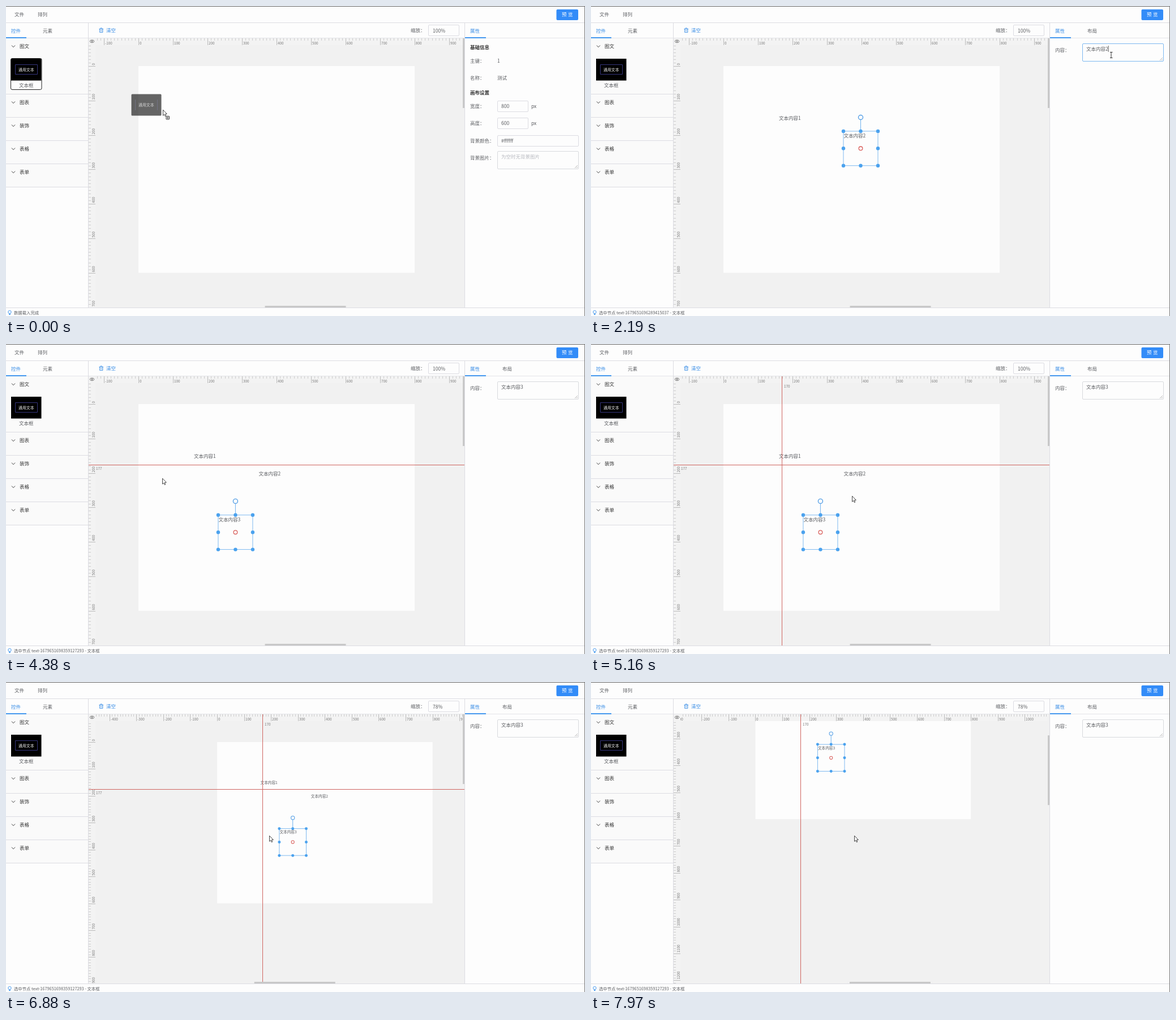
These frames come from a looping animation (1023 px wide and 547 px high, 8 s). An HTML page with a canvas:

```html
<!DOCTYPE html>
<html lang="zh-CN">
<head>
<meta charset="utf-8">
<style>
html, body { margin: 0; width: 100%; height: 100%; overflow: hidden; background: #fdfdfd; }
canvas { display: block; }
</style>
</head>
<body>
<canvas id="stage" width="1023" height="547"></canvas>
<script>
const c = document.getElementById('stage').getContext('2d');
const LOOP = 8000, STEP = 156.25;
const SX = 0.61, SY = 0.608;            // screen pixels per canvas unit at 100%
const FONT = '"Noto Sans CJK SC", "Noto Sans CJK", "Noto Sans", sans-serif';
const INK = '#5c5e62', DARK = '#333', BLUE = '#3a8ee6', LINE = '#dcdce2', GUIDE = '#cf6560';

// Pointer keys: step, x, y
const PATH = [[0, 277, 183], [2, 332, 191], [6, 919, 86], [7, 919, 86], [9, 45, 112],
  [11, 446, 221], [13, 919, 86], [14, 919, 86], [16, 45, 112], [18, 375, 302],
  [20, 919, 86], [21, 919, 86], [23, 425, 96], [24, 385, 62], [27, 400, 213.6],
  [29, 152, 260], [31, 337.7, 240], [33, 461, 268], [38, 465, 271]];
const ZOOM = [[33, 1], [38, 0.8], [39, 0.78]];
const PAN_X = [[40, 0], [44, 85.3], [47, 2.8]];
const PAN_Y = [[46, 0], [51, 148.6]];
const DRAGS = [[0, 2], [9, 11], [16, 18]];
const FOCUS = [[6, 9], [13, 16], [20, 24]];
const ITEMS = [
  { x: 160, y: 138, drop: 2, typed: 7, id: '1679651694176379212' },
  { x: 347.5, y: 189, drop: 11, typed: 14, id: '1679651696289415037' },
  { x: 231, y: 322, drop: 18, typed: 21, id: '1679651698359127293' }];

function track(keys, n, i = 1) {
  if (n <= keys[0][0]) return keys[0][i];
  for (let k = 1; k < keys.length; k++) {
    const a = keys[k - 1], b = keys[k];
    if (n <= b[0]) return a[i] + (b[i] - a[i]) * (n - a[0]) / (b[0] - a[0]);
  }
  return keys[keys.length - 1][i];
}
const within = (spans, n) => spans.some(([a, b]) => n >= a && n < b);

function rect(x, y, w, h, fill) {
  c.fillStyle = fill;
  c.fillRect(x, y, w, h);
}
function box(x, y, w, h, stroke, fill, r = 1.5) {
  c.beginPath();
  c.roundRect(x + 0.5, y + 0.5, w, h, r);
  if (fill) { c.fillStyle = fill; c.fill(); }
  if (stroke) { c.strokeStyle = stroke; c.lineWidth = 1; c.stroke(); }
}
function text(s, x, y, color = INK, size = 8.5, weight = 400) {
  c.font = `${weight} ${size}px ${FONT}`;
  c.fillStyle = color;
  c.fillText(s, x, y);
}
function lines(points, stroke, width = 1, fill, close) {
  c.beginPath();
  points.forEach(([x, y], i) => i ? c.lineTo(x, y) : c.moveTo(x, y));
  if (close) c.closePath();
  if (fill) { c.fillStyle = fill; c.fill(); }
  c.strokeStyle = stroke;
  c.lineWidth = width;
  c.stroke();
}
function dot(x, y, r, fill, stroke, width = 1.3) {
  c.beginPath();
  c.arc(x, y, r, 0, 7);
  if (fill) { c.fillStyle = fill; c.fill(); }
  if (stroke) { c.strokeStyle = stroke; c.lineWidth = width; c.stroke(); }
}
function clipped(x, y, w, h, draw) {
  c.save();
  c.beginPath();
  c.rect(x, y, w, h);
  c.clip();
  draw();
  c.restore();
}
function textarea(y, focus) {
  box(868, y, 143, 31, focus ? '#7db8f0' : '#d8dade', '#fdfdfd');
  lines([[1005, y + 30], [1010, y + 25]], '#999', 0.7);
  lines([[1008, y + 30], [1010, y + 28]], '#999', 0.7);
}

function chrome(zoom) {
  rect(0, 0, 1023, 547, '#fdfdfd');
  text('文件', 15, 15);
  text('排列', 56, 15);
  box(972, 5.5, 38.5, 19, null, '#338cf8', 2);
  text('预', 982, 15, '#fff');
  text('览', 993, 15, '#fff');
  rect(0, 29, 1023, 1, LINE);

  rect(0, 57, 145, 262, '#fafafa');
  rect(0, 56, 145, 1, '#e4e5e9');
  text('控件', 9, 44, BLUE);
  text('元素', 65, 44);
  rect(0, 55, 36, 2, '#4598ee');
  ['图文', '图表', '装饰', '表格', '表单'].forEach((name, i) => {
    const y = i ? 129 + 41 * i : 71;
    lines([[10, y - 1.5], [13, y + 1.7], [16, y - 1.5]], '#444');
    text(name, 24, y, DARK);
    rect(0, 155 + 41 * i, 145, 1, LINE);
  });

  rect(158, 42, 0, 0, BLUE);
  lines([[164.5, 40.5], [172, 40.5]], BLUE);
  lines([[166.8, 39.5], [166.8, 38.8], [169.7, 38.8], [169.7, 39.5]], BLUE, 0.8);
  lines([[165.6, 40.5], [165.6, 46.5], [170.9, 46.5], [170.9, 40.5]], BLUE, 0.9);
  lines([[167.4, 42], [167.4, 45]], BLUE, 0.6);
  lines([[169.2, 42], [169.2, 45]], BLUE, 0.6);
  text('清空', 177, 43, BLUE);
  text('缩放：', 715, 43);
  box(746, 33, 54, 19, LINE);
  text(Math.round(zoom * 100) + '%', 754, 43.3);
}

function thumb(hover) {
  if (hover) box(8, 92, 54.5, 55, '#222', '#fdfdfd', 2.5);
  rect(9, 93, 53.5, 38.5, '#000');
  box(16, 103, 39, 17, '#35357c', null, 0);
  text('通用文本', 22, 112, '#eee', 6.9);
  text('文本框', 23, 139.5);
}

function canvasProps() {
  text('基础信息', 820, 72.5, DARK, 8.5, 700);
  text('主键：', 820, 97);
  text('1', 868, 97);
  text('名称：', 820, 127);
  text('测试', 868, 127);
  text('画布设置', 820, 152.5, DARK, 8.5, 700);
  [['宽度：', '800', 177], ['高度：', '600', 207]].forEach(([label, value, y]) => {
    text(label, 820, y);
    box(868, y - 10, 54, 19, LINE);
    text(value, 875, y);
    text('px', 928, y);
  });
  text('背景颜色：', 820, 237.5);
  box(868, 228, 143, 19, LINE);
  text('#ffffff', 875, 237.5);
  text('背景图片：', 820, 268);
  textarea(256, false);
  text('为空时无背景图片', 875, 266, '#b8bac0');
}

function rightPanel(item, label, focus, caret) {
  rect(811, 56, 212, 1, '#e4e5e9');
  text('属性', 820, 44, BLUE);
  rect(811, 55, 37, 2, '#4598ee');
  if (!item) return canvasProps();
  text('布局', 877, 44);
  text('内容：', 820, 78);
  textarea(66, focus);
  text(label, 875, 76);
  if (caret) rect(875 + c.measureText(label).width, 70, 0.8, 11, '#333');
}

function selection(x, y, w, h, z) {
  const mx = x + w / 2, my = y + h / 2, ry = y - 24.4 * z;
  lines([[mx, ry], [mx, y]], '#6fb1ee');
  c.strokeStyle = '#7fbaf0';
  c.strokeRect(x, y, w, h);
  for (const i of [0, 0.5, 1]) for (const j of [0, 0.5, 1])
    if (i !== 0.5 || j !== 0.5) dot(x + i * w, y + j * h, 3.2 * z, '#4ba2ee');
  dot(mx, ry, 4 * z, '#fdfdfd', '#559fe6', 1.4 * z);
  dot(mx, my, 3.3 * z, '#fdfdfd', '#d95f5c', 1.3 * z);
}

function rulers(ox, oy, kx, ky) {
  rect(146, 57, 661, 12, '#f3f3f3');
  rect(146, 57, 12, 475, '#f3f3f3');
  clipped(158, 57, 649, 12, () => {
    for (let u = -700; u <= 1500; u += 10) {
      const x = Math.round(ox + u * kx), major = u % 100 === 0;
      rect(x, 57, 1, major ? 12 : 4, major ? '#bbb' : '#ccc');
      if (major) text(u, x + 2, 65.3, '#777', 6.3);
    }
  });
  clipped(146, 69, 12, 463, () => {
    for (let u = -300; u <= 1500; u += 10) {
      const y = Math.round(oy + u * ky), major = u % 100 === 0;
      rect(146, y, major ? 12 : 4, 1, major ? '#bbb' : '#ccc');
      if (!major) continue;
      c.save();
      c.translate(154.5, y - 1.5);
      c.rotate(-Math.PI / 2);
      text(u, 0, 0, '#777', 6.3);
      c.restore();
    }
  });
  rect(146, 57, 12, 12, '#f3f3f3');
  c.beginPath();
  c.ellipse(152, 62.3, 3.6, 2.3, 0, 0, 7);
  c.strokeStyle = '#555';
  c.lineWidth = 0.8;
  c.stroke();
  dot(152, 62.3, 1.1, '#555');
}

function workspace(n, mx, my, zoom, active, labelOf) {
  const kx = SX * zoom, ky = SY * zoom;
  const panX = track(PAN_X, n), panY = track(PAN_Y, n);
  const ox = 478 - 400 * kx + panX, oy = 106 - panY;
  clipped(146, 57, 664, 475, () => {
    rect(146, 57, 664, 475, '#f1f1f1');
    rect(ox, oy, 800 * kx, 600 * ky, '#fdfdfd');
    for (const item of ITEMS) {
      if (n < item.drop) continue;
      const x = ox + item.x * kx, y = oy + item.y * ky;
      if (item === active) selection(x, y, 100 * kx, 100 * ky, zoom);
      text(labelOf(item), x + 0.5, y + 7.6 * zoom, INK, 8.5 * zoom);
    }
    rulers(ox, oy, kx, ky);
    if (n >= 25) {
      const v = n < 27 ? (my - 106) / SY : 177, y = Math.round(oy + v * ky);
      if (y > 57) {
        rect(146, y - 1, 664, 1, GUIDE);
        text(Math.round(v), 159, y + 5.8, '#777', 6.3);
      }
    }
    if (n >= 30) {
      const v = n < 31 ? (mx - 234) / SX : 170, x = Math.round(ox + v * kx);
      rect(x - 1, 57, 1, 475, GUIDE);
      text(Math.round(v), x + 3, 75, '#777', 6.3);
    }
    rect(807, 57 + panY / 4, 3, 123, '#c8c8c8');
    rect(457.5 - panX * 0.22, 529, 143, 3, '#c8c8c8');
  });
}

function status(item) {
  rect(0, 532, 1023, 1, LINE);
  dot(6.5, 540, 2.7, null, '#4a9cf0', 1);
  rect(5.2, 543, 2.6, 2, '#4a9cf0');
  text(item ? `选中节点 text-${item.id} - 文本框` : '数据载入完成', 14, 541.3, INK, 7.35);
}

function pointer(x, y, dragging) {
  if (dragging) {
    const l = x - 56, t = y - 28;
    box(l, t, 53, 38, null, 'rgba(0,0,0,.6)', 1.5);
    lines([[l + 7.5, t + 10], [l + 7.5, t + 29]], '#77778c', 0.8);
    lines([[l + 46.5, t + 10], [l + 46.5, t + 29]], '#77778c', 0.8);
    text('通用文本', l + 13, t + 19, '#d4d4d4', 6.9);
  }
  if (x > 868 && x < 1011 && y > 66 && y < 97) {
    lines([[x - 2, y - 4.5], [x + 2.5, y - 4.5]], '#333');
    lines([[x, y - 4.5], [x, y + 5.5]], '#333');
    lines([[x - 2, y + 5.5], [x + 2.5, y + 5.5]], '#333');
    return;
  }
  const arrow = [[0, 0], [0, 10], [2.3, 8], [3.8, 11.4], [5.3, 10.7], [3.9, 7.4], [6.8, 7.1]];
  lines(arrow.map(([a, b]) => [x + 0.5 + a, y + 0.3 + b]), '#333', 0.9, '#fff', true);
  if (dragging) {
    box(x + 5.5, y + 11, 5.5, 5.5, '#333', '#fff', 0.5);
    lines([[x + 7, y + 14.3], [x + 10.5, y + 14.3]], '#333', 0.9);
    lines([[x + 8.75, y + 12.5], [x + 8.75, y + 16]], '#333', 0.9);
  }
}

function draw(time) {
  const n = Math.floor((time % LOOP + 5) / STEP);
  const mx = track(PATH, n, 1), my = track(PATH, n, 2);
  const zoom = Math.round(track(ZOOM, n) * 100) / 100;
  const active = ITEMS.filter(item => n >= item.drop).pop();
  const labelOf = item => '文本内容' + (n >= item.typed ? ITEMS.indexOf(item) + 1 : '');
  const dragging = within(DRAGS, n), focus = within(FOCUS, n);
  const overThumb = mx > 8 && mx < 63 && my > 92 && my < 148;

  c.textBaseline = 'middle';
  chrome(zoom);
  thumb(dragging || overThumb);
  workspace(n, mx, my, zoom, active, labelOf);
  rightPanel(active, active && labelOf(active), focus, focus && n >= active.typed);
  rect(145, 30, 1, 502, LINE);
  rect(146, 56, 664, 1, '#e4e5e9');
  rect(810, 30, 1, 502, LINE);
  status(active);
  rect(0, 0, 1023, 1, '#666');
  rect(1022, 0, 1, 547, '#777');
  pointer(mx, my, dragging);
}

const start = performance.now();
function tick() {
  draw(performance.now() - start);
  requestAnimationFrame(tick);
}
tick();
</script>
</body>
</html>
```
